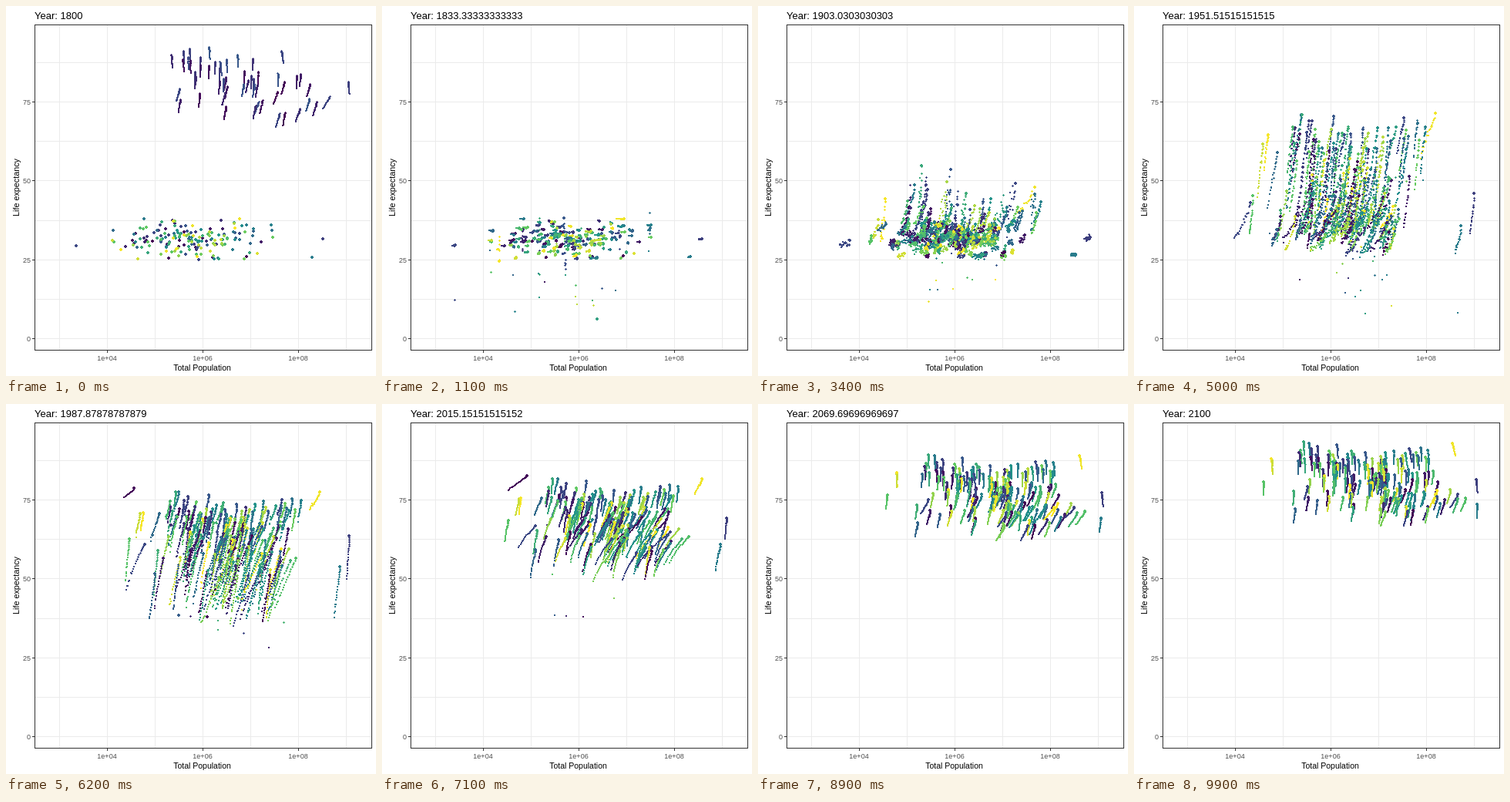
An HTML page with a canvas that plays this animation: 480x480 px, repeating every 10 s.

```html
<!DOCTYPE html>
<html lang="en">
<head>
<meta charset="utf-8">
<title>Life expectancy by population</title>
<style>
  html, body { margin: 0; width: 100%; height: 100%; overflow: hidden; background: #fff; }
  canvas { display: block; width: 480px; height: 480px; }
</style>
</head>
<body>
<canvas id="stage" width="480" height="480"></canvas>
<script>
const ctx = document.getElementById('stage').getContext('2d');
const FRAMES = 100, STEP = 100;
const WAKE = 20;          // trail samples, two per frame
const LAST = 198;         // last sample index
const WRAP = 0.28;        // only this share of the palette trails across the loop
const CLOUD = 176;
const FONT = '"Liberation Sans", Arial, sans-serif';
const PALETTE = [[68, 1, 84], [59, 82, 139], [33, 144, 140], [93, 200, 99], [253, 231, 37]];

let seed = 1907;
function rand() {
  seed = (seed + 0x6D2B79F5) | 0;
  let t = Math.imul(seed ^ (seed >>> 15), 1 | seed);
  t = (t + Math.imul(t ^ (t >>> 7), 61 | t)) ^ t;
  return ((t ^ (t >>> 14)) >>> 0) / 4294967296;
}
const gauss = () => (rand() + rand() + rand() + rand() - 2) * 1.73;
const clamp = (v, lo, hi) => Math.max(lo, Math.min(hi, v));
const mix = (a, b, k) => a + (b - a) * k;
const rise = (year, mid, width) => 1 / (1 + Math.exp((mid - year) / width));
const yearAt = frame => 1800 + 300 * frame / (FRAMES - 1);
const lifeY = years => 431.2 - years * 4.096;

function shade(v) {
  const p = v * (PALETTE.length - 1);
  const i = Math.min(Math.floor(p), PALETTE.length - 2);
  return `rgb(${PALETTE[i].map((c, j) => Math.round(mix(c, PALETTE[i + 1][j], p - i)))})`;
}

// Years of life; dev 0 develops late, dev 1 early
function life(year, dev, bias) {
  const lead = dev ** 4;
  const jump = mix(24, 41, dev) * rise(year, 1968 - 30 * dev - 33 * lead, 13 + 7 * lead);
  return 31 + dev + jump + 0.14 * Math.max(0, year - 1970) + bias * (1 - (year - 1800) / 700);
}

// Sideways drift in pixels; mature populations level off and shrink
function growth(year, mature) {
  const young = 118 * rise(year, 1975, 42) - 2;
  const old = 52 * rise(year, 1890, 40) - 5 - 0.1 * Math.max(0, year - 2040);
  return mix(young, old, mature);
}

// Yearly wobble, the 1918 epidemic and short crises, in pixels
function shock(s, dev) {
  const wild = dev > 0.92 && s > 16 && s < 76;
  const drop = gauss() * (wild ? 11 : s > 50 && s < 110 ? 2 : 0.15);
  const risk = s > 124 ? 0 : s > 74 && s < 98 ? 0.013 : 0.004;
  const struck = rand() < risk, depth = rand();
  if (s === 77 || s === 78) return drop + 20 + depth * 40;
  return struck && s > 4 ? drop + 20 + depth * 70 : drop;
}

function place({ v, x, dev, bias = 0, pace = 1, mature = dev, from = 0, to = LAST }) {
  const pts = [];
  for (let s = 0; s <= LAST; s++) {
    const year = yearAt(s / 2);
    pts.push([x + pace * growth(year, mature), lifeY(life(year, dev, bias)) + shock(s, dev)]);
  }
  return { v, color: shade(v), pts, from, to };
}

function startX() {
  let x;
  do x = 242 + 46 * gauss(); while (x < 137 || x > 347);
  return x;
}

function build() {
  const list = [];
  for (let i = 0; i < CLOUD; i++) {
    const x = startX();
    const pace = clamp(1 + 0.4 * gauss(), 0.35, 1.8) * (x > 290 ? 0.75 : 1);
    list.push(place({ v: i / (CLOUD - 1), x, dev: rand(), bias: clamp(gauss() * 2.8, -6, 6), pace }));
  }
  // Outliers at the edges of the cloud
  list.push(
    place({ v: 0.19, x: 411, dev: 0.45, pace: 0.8, mature: 1 }),
    place({ v: 0.42, x: 397, dev: 0.2, bias: -5.5, pace: 0.7, mature: 0.6 }),
    place({ v: 0.98, x: 303, dev: 0.9, bias: 6, pace: 2.3, mature: 0.9 }),
    place({ v: 0.44, x: 344, dev: 0.85, bias: 4, pace: 0.9, mature: 1 }),
    place({ v: 0.41, x: 179, dev: 0.9, bias: 6 }),
    place({ v: 0.22, x: 91, dev: 0.4, bias: -2, pace: 1.5, mature: 0.3 }),
    place({ v: 0.02, x: 84, dev: 1, bias: 5, pace: 1.25, mature: 0, from: 114, to: 142 })
  );
  return list.sort((a, b) => a.v - b.v);
}
const places = build();

function rect(x, y, w, h, c) {
  ctx.fillStyle = c;
  ctx.fillRect(x, y, w, h);
}

// Hard-edged dot, 2 to 4 pixels wide
function dot([px, py], size, c) {
  const x = Math.round(px), y = Math.round(py);
  if (size === 2) return rect(x - 1, y - 1, 2, 2, c);
  if (size === 3) {
    rect(x - 1, y, 3, 1, c);
    return rect(x, y - 1, 1, 3, c);
  }
  rect(x - 2, y - 1, 4, 2, c);
  rect(x - 1, y - 2, 2, 4, c);
}

function text(str, x, y, size, color, align) {
  ctx.font = `${size}px ${FONT}`;
  ctx.fillStyle = color;
  ctx.textAlign = align;
  ctx.fillText(str, x, y);
}

const gridY = i => Math.round(431.2 - i * 51.2);

function drawPanel() {
  rect(0, 0, 480, 480, '#fff');
  for (let x = 69; x < 474; x += 62) rect(x, 25, 1, 421, '#ebebeb');
  for (let i = 0; i < 8; i++) rect(37, gridY(i), 437, 1, '#ebebeb');
}

function drawAxes() {
  ctx.lineWidth = 1;
  ctx.strokeStyle = '#333';
  ctx.strokeRect(37.5, 24.5, 437, 422);
  for (let i = 0; i < 3; i++) {
    const x = 131 + i * 124;
    rect(x, 447, 1, 3, '#333');
    text(`1e+0${4 + 2 * i}`, x, 460, 9, '#4d4d4d', 'center');
  }
  for (let i = 0; i < 4; i++) {
    const y = gridY(2 * i);
    rect(34, y, 3, 1, '#333');
    text(25 * i, 32, y + 4, 9, '#4d4d4d', 'right');
  }
  text('Total Population', 254.5, 473, 10.5, '#000', 'center');
  ctx.save();
  ctx.translate(17, 235.5);
  ctx.rotate(-Math.PI / 2);
  text('Life expectancy', 0, 0, 10.8, '#000', 'center');
  ctx.restore();
}

function drawPoints(frame) {
  const now = frame * 2;
  ctx.save();
  ctx.beginPath();
  ctx.rect(38, 25, 436, 421);
  ctx.clip();
  for (let k = WAKE; k >= 0; k--) {
    const size = k === 0 ? 4 : k < 9 ? 3 : 2;
    for (const p of places) {
      let s = now - k;
      if (s < 0) {
        if (p.v > WRAP) continue;
        s += LAST + 1;
      }
      if (s >= p.from && s <= p.to) dot(p.pts[s], size, p.color);
    }
  }
  ctx.restore();
}

let shown = -1;
function draw(time) {
  const frame = Math.floor(time / STEP) % FRAMES;
  if (frame === shown) return;
  shown = frame;
  drawPanel();
  drawPoints(frame);
  drawAxes();
  text('Year: ' + Number(yearAt(frame).toPrecision(15)), 37, 17, 13, '#000', 'left');
}

const start = performance.now();
function tick() {
  draw(performance.now() - start);
  requestAnimationFrame(tick);
}
tick();
</script>
</body>
</html>
```
